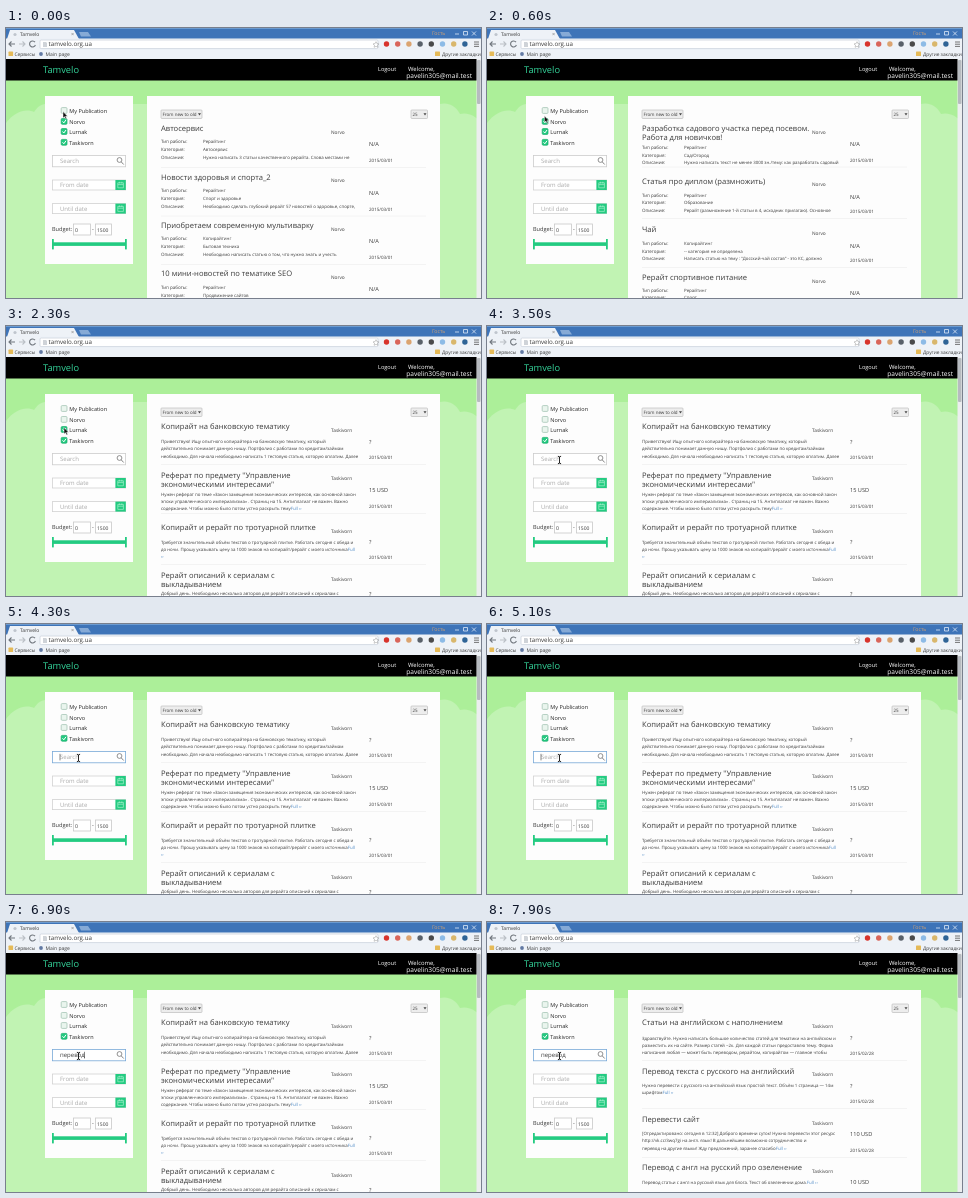
An HTML page that plays this animation: 475 by 270 pixels, repeating every 8000 ms.

```html
<!DOCTYPE html>
<html lang="ru">
<head>
<meta charset="utf-8">
<title>Tamvelo</title>
<style>
html, body { margin: 0; width: 100%; height: 100%; overflow: hidden; background: #fff; }
svg { display: block; width: 100vw; height: 100vh; }
text { font-family: "Open Sans", "Noto Sans", sans-serif; text-rendering: geometricPrecision; white-space: pre; }
</style>
</head>
<body>
<svg id="stage" viewBox="0 0 475 270" preserveAspectRatio="none"></svg>
<script>
const LOOP = 8000;
const GREEN = '#23cb81', INK = '#3a3a3a';
const stage = document.getElementById('stage');

const esc = s => s.replace(/&/g, '&amp;').replace(/</g, '&lt;');
const text = (x, y, s, size, fill = INK, extra = '') =>
  `<text x="${x}" y="${y}" font-size="${size}" fill="${fill}" ${extra}>${esc(s)}</text>`;
const rect = (x, y, w, h, fill, extra = '') =>
  `<rect x="${x}" y="${y}" width="${w}" height="${h}" fill="${fill}" ${extra}/>`;
const path = (d, fill, extra = '') => `<path d="${d}" fill="${fill}" ${extra}/>`;
const line = (d, stroke, width = 1) => path(d, 'none', `stroke="${stroke}" stroke-width="${width}"`);
const dot = (x, y, r, fill) => `<circle cx="${x}" cy="${y}" r="${r}" fill="${fill}"/>`;
const box = (x, y, w, h, stroke = '#c9c9c9', extra = '') =>
  rect(x, y, w, h, '#fff', `stroke="${stroke}" stroke-width=".8" ${extra}`);

function browser() {
  const icons = ['#d8342c', '#d9655a', '#dba470', '#59616a', '#4a4a4a', '#8dbbe6', '#d9b76c', '#2f6496'];
  return rect(0, 0, 475, 11, '#3e74b8') + rect(0, 0, 475, 1, '#6c9bd0') +
    path('M1 11 L4 2 H68 L73 11 Z', '#eef2f7') + path('M75 8.5 L73 4 H82 L85 8.5 Z', '#86aad6') +
    dot(9, 6.5, 1.6, '#bfc5cd') + text(14, 8, 'Tamvelo', 5) + text(65, 8, '×', 5.5, '#777') +
    text(426, 7.2, 'Гость', 5.2, '#d0a074') +
    line('M449 6 H453 M457.5 3.5 H461.5 V7 H457.5 Z M466 3.5 L470 7.5 M470 3.5 L466 7.5', '#dce8f6', .8) +
    rect(0, 10.5, 475, 20.5, '#eef2f7') +
    line('M9 16 H3 M5.5 13.5 L3 16 L5.5 18.5', '#71777e', 1.1) +
    line('M13 16 H19 M16.5 13.5 L19 16 L16.5 18.5', '#bbc0c6', 1.1) +
    line('M29 14.2 A3 3 0 1 0 29.4 17', '#71777e', 1.1) +
    box(34, 12, 338, 8.6, '#cdd4dd', 'rx="1.2"') +
    path('M37 14 h3 l1 1 v4 h-4 Z', '#cfd3d8') +
    text(42.5, 18.3, 'tamvelo.org.ua', 6.2) +
    line('M370 13.7 l1 2 2 .2 -1.5 1.4 .4 2 -1.9 -1 -1.9 1 .4 -2 -1.5 -1.4 2 -.2 Z', '#999', .5) +
    icons.map((c, i) => dot(380.5 + i * 11.2, 16, 2.7, c)).join('') +
    line('M468 14 h5 m-5 2.2 h5 m-5 2.2 h5', '#666', .9) +
    rect(2.5, 23.6, 4.6, 4.4, '#e5ba58', 'rx=".6"') + text(8.5, 27.8, 'Сервисы', 4.9) +
    dot(35, 26, 1.9, '#6279a3') + text(39.5, 27.8, 'Main page', 5) +
    rect(429, 23.6, 5, 4.4, '#e5ba58', 'rx=".6"') + text(436, 27.8, 'Другие закладки', 4.8);
}

function page() {
  return rect(0, 31, 475, 239, '#acef99') +
    path('M0 95 C8 84 20 80 28 84 C32 78 36 76 40 76 H434 C442 74 450 78 454 86 ' +
      'C462 84 470 88 475 95 V270 H0 Z', '#c1f3b3') +
    rect(0, 31, 475, 21.5, '#000') +
    text(37, 44.5, 'Tamvelo', 9.3, '#34d49a') +
    text(372, 43, 'Logout', 5.6, '#fff') + text(402, 43, 'Welcome,', 5.9, '#fff') +
    text(466, 50, 'pavelin305@mail.test', 6.6, '#fff', 'text-anchor="end"') +
    rect(470.5, 31, 4.5, 239, '#eceeef') + rect(471, 32, 3.5, 44, '#b7bbc0', 'rx="1"') +
    rect(39, 68, 88, 168, '#fdfdfd') + rect(141, 68, 293, 202, '#fdfdfd');
}

function dateField(y, label) {
  return box(46.4, y, 73.2, 10, '#d2d2d2') + text(54, y + 7, label, 6, '#aaa') +
    rect(109.4, y, 10.4, 10, GREEN) +
    line(`M111.8 ${y + 2.8} h5.6 v5 h-5.6 Z m0 1.8 h5.6 m-4 -2.8 v1.6 m2.4 -1.6 v1.6`, '#a5efcb', .7);
}

function select(x, w, label) {
  return rect(x, 82, w, 8.5, '#ededed', 'stroke="#bdbdbd" stroke-width=".7" rx=".8"') +
    text(x + 1.5, 88, label, 4.5) + path(`M${x + w - 4} 85.2 h3 l-1.5 2.2 Z`, '#444');
}

function controls() {
  return dateField(152, 'From date') + dateField(175.6, 'Until date') +
    text(46, 203.3, 'Budget:', 5.6) + box(67.4, 196, 17, 11) + text(69, 203.5, '0', 5.2) +
    text(86, 203.3, '-', 5.5) + box(89.4, 196, 16, 11) + text(91, 203.5, '1500', 5) +
    rect(47, 214.3, 73, 3.6, GREEN) + rect(46, 211, 1.8, 10.4, GREEN) + rect(119, 211, 1.8, 10.4, GREEN) +
    select(155, 41, 'From new to old') + select(405, 16.5, '25');
}

// Listing entry: title lines from y, then body lines either as labelled fields or as a paragraph.
const entry = (y, title, bodyY, body, price, priceY, dateY, date) =>
  ({ y, title, bodyY, body, price, priceY, dateY, date });
const job = (y, title, bodyY, body, priceY = y + 15, dateY = y + 31) =>
  entry(y, title, bodyY, body, 'N/A', priceY, dateY, '2015/03/01');

const lists = [
  { site: 'Norvo', fields: true, step: 7.8, items: [
    job(103, ['Автосервис'], 115, ['Рерайтинг', 'Автосервис', 'Нужно написать 3 статьи качественного рерайта. Слова местами не']),
    job(151.5, ['Новости здоровья и спорта_2'], 164, ['Рерайтинг', 'Спорт и здоровье', 'Необходимо сделать глубокий рерайт 57 новостей о здоровье, спорте,']),
    job(200, ['Приобретаем современную мультиварку'], 212, ['Копирайтинг', 'Бытовая техника', 'Необходимо написать статью о том, что нужно знать и учесть']),
    job(248, ['10 мини-новостей по тематике SEO'], 261, ['Рерайтинг', 'Продвижение сайтов'])
  ] },
  { site: 'Norvo', fields: true, step: 7.5, items: [
    job(103, ['Разработка садового участка перед посевом.', 'Работа для новичков!'], 121, ['Рерайтинг', 'Сад/Огород', 'Нужно написать текст не менее 3000 зн./тему: как разработать садовый'], 118, 133.5),
    job(155.5, ['Статья про диплом (размножить)'], 168.5, ['Рерайтинг', 'Образование', 'Рерайт (размножение 1-й статьи в 4, исходник прилагаю). Основное'], 171, 185),
    job(204, ['Чай'], 217, ['Копирайтинг', '-- категория не определена', 'Написать статью на тему : "Досский-чай состав" - это КС, должно'], 220, 234),
    job(252, ['Рерайт спортивное питание'], 263.5, ['Рерайтинг', 'Спорт'])
  ] },
  { site: 'Taskivorn', step: 7.4, items: [
    entry(103, ['Копирайт на банковскую тематику'], 117, ['Приветствую! Ищу опытного копирайтера на банковскую тематику, который',
      'действительно понимает данную нишу. Портфолио с работами по кредитам/займам', 'необходимо. Для начала необходимо написать 1 тестовую статью, которую оплатим. Далее'], '?', 118, 133, '2015/03/01'),
    entry(151.5, ['Реферат по предмету "Управление', 'экономическими интересами"'], 169.5, ['Нужен реферат по теме «Закон замещения экономических интересов, как основной закон',
      'эпохи управленческого империализма» . Страниц на 15. Антиплагиат не важен. Важно', 'содержание. Чтобы можно было потом устно раскрыть тему|Full ››'], '15 USD', 166, 182, '2015/03/01'),
    entry(204, ['Копирайт и рерайт по тротуарной плитке'], 217.5, ['Требуется значительный объём текстов о тротуарной плитке. Работать сегодня с обеда и',
      'до ночи. Прошу указывать цену за 1000 знаков на копирайт/рерайт с моего источника|Full', '|››'], '?', 217.5, 233, '2015/03/01'),
    entry(252, ['Рерайт описаний к сериалам с', 'выкладыванием'], 268.5, ['Добрый день. Необходимо несколько авторов для рерайта описаний к сериалам с'], '?', 270, 286, '2015/03/01')
  ] },
  { site: 'Taskivorn', step: 7.4, items: [
    entry(103, ['Статьи на английском с наполнением'], 117.5, ['Здравствуйте. Нужно написать большое количество статей для тематики на английском и',
      'разместить их на сайте. Размер статей ~2к. Для каждой статьи предоставлю тему. Форма', 'написания любая — может быть переводом, рерайтом, копирайтом — главное чтобы'], '?', 118, 133, '2015/02/28'),
    entry(151.5, ['Перевод текста с русского на английский'], 165, ['Нужно перевести с русского на английский язык простой текст. Объём 1 страница — 14м',
      'шрифтом|Full ››'], '?', 166, 181, '2015/02/28'),
    entry(200, ['Перевести сайт'], 213, ['[Отредактировано: сегодня в 12:32] Доброго времени суток! Нужно перевести этот ресурс',
      'http://vk.cc/3wq7gi на англ. язык! В дальнейшем возможно сотрудничество и', 'перевод на другие языки! Жду предложений, заранее спасибо|Full ››'], '110 USD', 214, 230, '2015/02/28'),
    entry(248, ['Перевод с англ на русский про озеленение'], 262, ['Перевод статьи с англ на русский язык для блога. Текст об озеленении дома.|Full ››'], '10 USD', 262, 277, '2015/02/28')
  ] }
];

// A bar in the line starts the blue link.
function bodyLine(s, y) {
  const [main, link = ''] = s.split('|');
  return `<text x="155" y="${y}" font-size="4.4" fill="${INK}">${esc(main)}<tspan fill="#4b87c5">${link}</tspan></text>`;
}

function renderList({ site, fields, step, items }) {
  const names = ['Тип работы:', 'Категория:', 'Описание:'];
  return items.map(it =>
    it.title.map((s, i) => text(155, it.y + i * 9.2, s, 7.6)).join('') +
    text(325, it.y + 2.8, site, 4.8) +
    it.body.map((s, i) => {
      const y = it.bodyY + i * step;
      return fields ? text(155, y, names[i], 4.5) + text(197, y, s, 4.4) : bodyLine(s, y);
    }).join('') +
    text(363, it.priceY, it.price, 5.6) + text(363, it.dateY, it.date, 4.5) +
    line(`M155 ${it.dateY + 5.5} H420`, '#f1f1f1', .8)
  ).join('');
}

const listMarkup = lists.map(renderList);

// Times at which each listing appears.
const listTimes = [0, 600, 1800, 7500];
const checks = [
  { label: 'My Publication', y: 82.3, off: 0 },
  { label: 'Norvo', y: 93.2, off: 1300 },
  { label: 'Lurnak', y: 103.3, off: 2400 },
  { label: 'Taskivorn', y: 114.1, off: Infinity }
];
const query = 'перевод';
const keyTimes = [5400, 5600, 5800, 6100, 6400, 6600, 6800];
const focusTime = 4300;
const pointer = [[0, 57, 83.5], [300, 57, 83.5], [1000, 58, 94.5], [1500, 58, 94.5],
  [1950, 58, 101.5], [2450, 58, 101.5], [3300, 72.5, 134]];

function checkbox({ label, y, off }, t) {
  const on = t < off;
  return rect(55.2, y - 2.7, 5.8, 5.8, on ? GREEN : '#eaf5ee', `rx="1" stroke="${on ? '#16a968' : '#9dbfae'}" stroke-width=".7"`) +
    (on ? line(`M56.5 ${y + .2} l1.3 1.5 2.2 -3`, '#fff', 1) : '') +
    text(63.3, y + 2.4, label, 5.5, '#222', 'font-weight="500"');
}

function search(t) {
  const focused = t >= focusTime;
  const typed = query.slice(0, keyTimes.filter(k => t >= k).length);
  const caretOn = focused && (t < 5400 || t > 6800) && Math.floor((t - focusTime) / 400) % 2 === 0;
  return box(46.4, 127.4, 73.2, 11.4, focused ? '#79a9d8' : '#ccc') +
    (typed ? text(54, 135, typed, 6) : text(54, 135, 'Search', 6, '#aaa')) +
    (caretOn ? line(`M${54 + typed.length * 3.5} 129.8 v6.6`, '#333', .6) : '') +
    `<circle cx="113.5" cy="132" r="2.4" fill="none" stroke="#777" stroke-width=".8"/>` +
    line('M115.2 133.8 l2.5 2.7', '#777', .9);
}

function pointerAt(t) {
  const next = pointer.findIndex(p => p[0] > t);
  if (next < 0) return pointer[pointer.length - 1].slice(1);
  const [t0, x0, y0] = pointer[next - 1], [t1, x1, y1] = pointer[next];
  const u = (t - t0) / (t1 - t0), k = u * u * (3 - 2 * u);
  return [x0 + (x1 - x0) * k, y0 + (y1 - y0) * k];
}

function cursor(t) {
  const [x, y] = pointerAt(t);
  const shape = y > 127
    ? line('M-1.6 -3.7 Q0 -3.7 0 -2.7 Q0 -3.7 1.6 -3.7 M0 -3 V3 M-1.6 3.7 Q0 3.7 0 2.7 Q0 3.7 1.6 3.7', '#111', .9)
    : path('M0 0 V6.6 L1.5 5.2 L2.6 7.6 L3.7 7.1 L2.6 4.8 H4.6 Z', '#111', 'stroke="#fff" stroke-width=".5"');
  return `<g transform="translate(${x} ${y})">${shape}</g>`;
}

stage.innerHTML = page() + browser() + controls() + '<g id="list"></g><g id="live"></g>';
const list = document.getElementById('list'), live = document.getElementById('live');
let shown = -1;

function draw(t) {
  const current = listTimes.filter(s => t >= s).length - 1;
  if (current !== shown) list.innerHTML = listMarkup[shown = current];
  live.innerHTML = checks.map(c => checkbox(c, t)).join('') + search(t) + cursor(t);
}

const start = performance.now();
function tick() {
  draw((performance.now() - start) % LOOP);
  requestAnimationFrame(tick);
}
tick();
</script>
</body>
</html>
```
